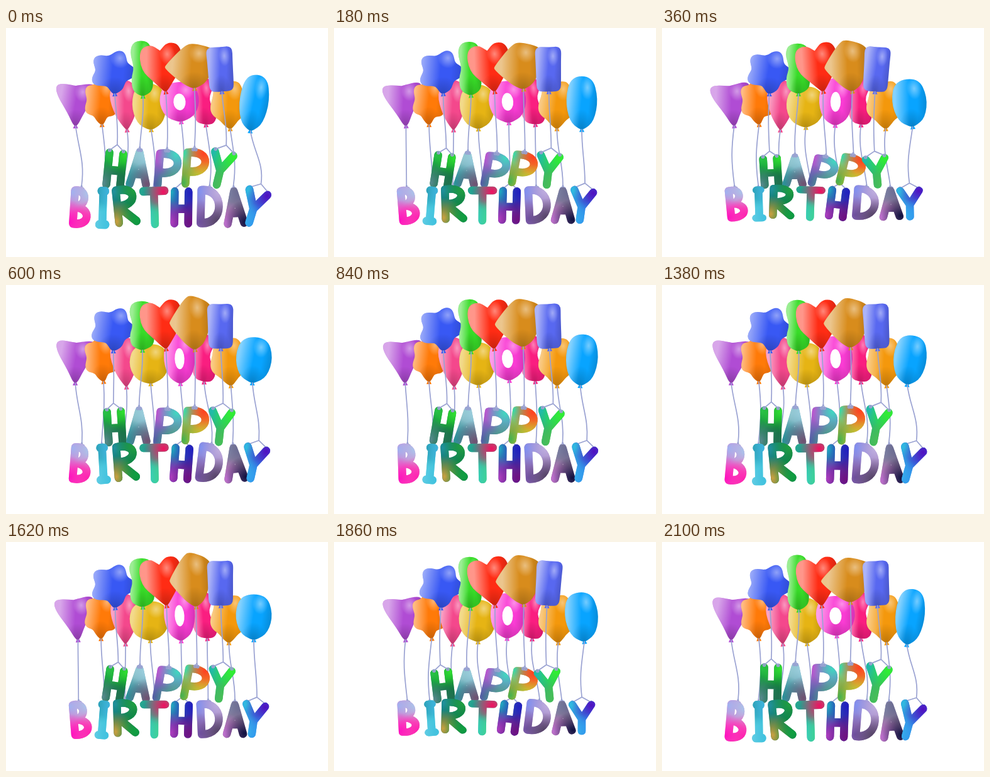
An HTML page with a canvas that plays this animation: 512 by 365 pixels, repeating every 2160 ms.

```html
<!DOCTYPE html>
<html lang="en">
<head>
<meta charset="utf-8">
<title>Happy Birthday</title>
<style>
html, body { margin: 0; width: 100%; height: 100%; overflow: hidden; background: #fff; }
canvas { display: block; }
</style>
</head>
<body>
<canvas id="stage" width="512" height="365"></canvas>
<script>
const ctx = document.getElementById('stage').getContext('2d');
const LOOP = 2160, STEP = 60, STRING = '#9aa2d2', DEG = Math.PI / 180;

// Outlines fill -50..50 both ways, with the knot at 0,50
const lobes = (count, depth, turn) => {
  const pts = [[-5, 50]];
  for (let deg = 110; deg <= 430; deg += 8) {
    const r = 1 - depth + depth * Math.cos(count * (deg - turn) * DEG);
    pts.push([56 * r * Math.cos(deg * DEG), -3 + 51 * r * Math.sin(deg * DEG)]);
  }
  return [...pts, [5, 50]];
};
// Mirrors a left half, listed from the knot upwards
const mirror = half => [...half, ...half.map(([x, y]) => [-x, y]).reverse()];

const egg = mirror([[-8, 50], [-44, 34], [-59, -10], [-38, -54]]);
const SHAPES = {
  egg,
  ring: egg,
  triangle: mirror([[-6, 50], [-22, 22], [-60, -30], [-56, -54], [0, -47]]),
  drop: mirror([[-5, 50], [-42, 18], [-62, -28], [-30, -56]]),
  heart: mirror([[-4, 50], [-30, 26], [-64, -4], [-62, -50], [-26, -59], [0, -42]]),
  worm: mirror([[-8, 50], [-54, 40], [-58, 15], [-40, -5], [-60, -35], [-38, -56]]),
  bar: mirror([[-8, 50], [-50, 49], [-52, 20], [-53, -20], [-56, -54], [0, -53]]),
  bean: [[-4, 50], [-48, 40], [-60, -5], [-40, -52], [20, -60], [60, -38], [20, -5], [58, 26], [40, 50]],
  diamond: [[-5, 50], [-30, 34], [-66, -4], [-64, -12], [-12, -55], [10, -58], [62, -38], [62, -10], [32, 38], [5, 50]],
  star: lobes(6, .1, -145),
  splash: lobes(5, .13, -135),
  flower: lobes(5, .07, -125)
};

const GLYPHS = {
  H: 'M-11-23V23M11-23V23M-11 2H11',
  A: 'M-13 23L0-23L13 23M-8 8H8',
  P: 'M-13 23L-11-22C28-28 26 10-10 5',
  Y: 'M-15-23L0 2L15-23M0 2V23',
  B: 'M-10-24V24C18 27 18 0-8 0C12-4 9-28-10-24',
  I: 'M0-24V24M-5 25H5M-3-24H3',
  R: 'M-13 24V-23C22-28 20 2-12 0L15 24',
  T: 'M-17-24H17M0-24V24',
  D: 'M-13-24V24C26 26 24-28-13-24'
};

// size: balloon centre and extent; puff: change of width; spot: letter centre
// turn, swing and phase: rest angle, amplitude and delay of the letter, in degrees
// inks: middle, top left, top right, bottom left, bottom right
const lower = {
  tilt: .8, bob: 3, bow: 5,
  items: [
    { shape: 'triangle', color: '#b04cd4', size: [111, 123, 54, 66], lean: -3, puff: 0,
      glyph: 'B', spot: [118, 283], turn: -1, swing: 6, phase: -39, inks: ['#f070c0', '#a0b0f0', '#a0d0f0', '#ff10c0', '#ff20b0'] },
    { shape: 'star', color: '#ff7a08', size: [151, 118, 50, 72], lean: -4, puff: 0,
      glyph: 'I', spot: [154, 283], turn: 0, swing: 5, phase: 69, inks: ['#40c8d8', '#2090a0', '#40b0e0', '#70d0e8', '#40c0e0'] },
    { shape: 'drop', color: '#f4488c', size: [189, 125, 40, 75], lean: -2, puff: 0,
      glyph: 'R', spot: [190, 280], turn: -2, swing: 4, phase: 174, inks: ['#0a7050', '#2090a0', '#20a040', '#d0a040', '#10a040'] },
    { shape: 'egg', color: '#e6b414', size: [228, 127, 53, 65], lean: -3, puff: -4,
      glyph: 'T', spot: [236, 283], turn: 0, swing: 2, phase: 171, inks: ['#40b890', '#20a090', '#f01060', '#30d0e0', '#40d890'] },
    { shape: 'bean', color: '#fa1e80', size: [314, 119, 35, 71], lean: -5, puff: 0,
      glyph: 'D', spot: [323, 282], turn: 3, swing: 6, phase: -104, inks: ['#a080c0', '#8090f0', '#c0b0e0', '#7050a0', '#504060'] },
    { shape: 'ring', color: '#fa3cd4', size: [276, 119, 51, 68], lean: -2, puff: 6,
      glyph: 'H', spot: [279, 283], turn: 4, swing: 4, phase: -149, inks: ['#4030a0', '#20b0c0', '#2020c0', '#b040c0', '#701080'] },
    { shape: 'flower', color: '#f4980c', size: [354, 122, 54, 77], lean: -3, puff: 0,
      glyph: 'A', spot: [364, 283], turn: -3, swing: 3, phase: 103, inks: ['#907090', '#8090b0', '#606890', '#c070d0', '#101040'] },
    { shape: 'egg', color: '#08a4ff', size: [394, 121, 47, 77], lean: 0, puff: -5,
      glyph: 'Y', spot: [394, 283], turn: 8, swing: 9, phase: 0, inks: ['#3070e0', '#30c0e0', '#5010c0', '#40d0f0', '#30a0f0'] }
  ]
};
const upper = {
  tilt: -.4, bob: -2, bow: 2,
  items: [
    { shape: 'splash', color: '#3858f4', size: [170, 71, 67, 68], lean: -3, puff: 0,
      glyph: 'H', spot: [173, 227], turn: 1, swing: 9, phase: 59, inks: ['#0a7a3a', '#28c048', '#30e030', '#5a8a90', '#207050'] },
    { shape: 'worm', color: '#38dc28', size: [216, 67, 32, 78], lean: -2, puff: -2,
      glyph: 'A', spot: [211, 226], turn: 2, swing: 2, phase: 56, inks: ['#60a0b0', '#98ccd0', '#a8d8e8', '#2a9098', '#705070'] },
    { shape: 'heart', color: '#ff2c14', size: [249, 66, 53, 72], lean: -10, puff: 0,
      glyph: 'P', spot: [255, 227], turn: 7, swing: 5, phase: 170, inks: ['#8070c0', '#c050d0', '#40d8c0', '#5060a0', '#30c070'] },
    { shape: 'diamond', color: '#d88c1c', size: [296, 63, 60, 73], lean: -8, puff: 6,
      glyph: 'P', spot: [299, 225], turn: 6, swing: 5, phase: 155, inks: ['#e0a030', '#30e0b0', '#ff4020', '#40b050', '#c0d030'] },
    { shape: 'bar', color: '#5868f0', size: [341, 67, 38, 69], lean: 0, puff: 0,
      glyph: 'Y', spot: [341, 227], turn: 4, swing: 10, phase: 17, inks: ['#30c060', '#20b8b0', '#30f030', '#40b070', '#50c050'] }
  ]
};

// Three sways a loop; balloons puff up twice a loop and keep their area
const wave = (t, cycles, phase = 0) => Math.cos((360 * cycles * t / LOOP - phase) * DEG);

function balloonPose(item, row, t) {
  const [x, y, w, h] = item.size;
  const grow = 1 + item.puff / w * wave(t, 2);
  const angle = (item.lean + row.tilt * item.swing * wave(t, 3, item.phase)) * DEG;
  const height = h / grow;
  return {
    x, y, angle, width: w * grow, height,
    knotX: x - Math.sin(angle) * height / 2,
    knotY: y + Math.cos(angle) * height / 2
  };
}

function letterPose(item, row, t) {
  const [x, y] = item.spot;
  return {
    x, y: y + row.bob * wave(t, 3),
    angle: (item.turn + item.swing * wave(t, 3, item.phase)) * DEG,
    stretch: 1 + .09 * wave(t, 3)
  };
}

function outline(pts) {
  const mid = (a, b) => [(a[0] + b[0]) / 2, (a[1] + b[1]) / 2];
  ctx.beginPath();
  ctx.moveTo(...mid(pts[pts.length - 1], pts[0]));
  pts.forEach((p, i) => ctx.quadraticCurveTo(...p, ...mid(p, pts[(i + 1) % pts.length])));
  ctx.closePath();
}

function glow(x, y, r, color) {
  const g = ctx.createRadialGradient(x, y, 0, x, y, r);
  g.addColorStop(0, color);
  g.addColorStop(1, color.slice(0, 7) + '00');
  return g;
}

function sideLight() {
  const g = ctx.createLinearGradient(-50, 8, 50, 28);
  g.addColorStop(0, '#ffffff80');
  g.addColorStop(.45, '#ffffff00');
  g.addColorStop(.7, '#00000000');
  g.addColorStop(1, '#00000028');
  return g;
}

function drawBalloon(item, row, t) {
  const { x, y, angle, width, height } = balloonPose(item, row, t);
  ctx.save();
  ctx.translate(x, y);
  ctx.rotate(angle);
  ctx.fillStyle = item.color;
  ctx.beginPath();
  ctx.moveTo(0, height / 2 - 5);
  ctx.lineTo(4, height / 2 + 4);
  ctx.lineTo(-4, height / 2 + 4);
  ctx.fill();
  ctx.scale(width / 100, height / 100);
  outline(SHAPES[item.shape]);
  if (item.shape === 'ring') {
    ctx.moveTo(17, -2);
    ctx.ellipse(0, -2, 17, 22, 0, 0, 7);
  }
  for (const paint of [item.color, sideLight(), glow(0, 50, 40, '#00000038'), glow(20, -32, 24, '#ffffff70')]) {
    ctx.fillStyle = paint;
    ctx.fill('evenodd');
  }
  ctx.restore();
}

function drawString(item, row, t) {
  const { knotX, knotY } = balloonPose(item, row, t);
  const { x, y, angle, stretch } = letterPose(item, row, t);
  const reach = { H: 11, Y: 15 }[item.glyph] || 2;
  const sin = Math.sin(angle), cos = Math.cos(angle);
  const at = (px, py) => [x + px * cos - py * stretch * sin, y + px * sin + py * stretch * cos];
  const [jointX, jointY] = at(0, reach > 2 ? -36 : -33);
  const bend = row.bow * wave(t, 3), pull = (jointY - knotY) * .4;
  ctx.strokeStyle = STRING;
  ctx.lineWidth = 1.7;
  ctx.beginPath();
  ctx.moveTo(knotX, knotY);
  ctx.bezierCurveTo(knotX + bend, knotY + pull, jointX + bend, jointY - pull, jointX, jointY);
  for (const side of [-reach, reach]) {
    const [endX, endY] = at(side, -27);
    ctx.moveTo(jointX, jointY);
    ctx.lineTo(endX, endY);
    ctx.moveTo(endX + 2, endY);
    ctx.arc(endX, endY, 2, 0, 7);
  }
  ctx.stroke();
}

function drawLetter(item, row, t) {
  const { x, y, angle, stretch } = letterPose(item, row, t);
  const [middle, ...corners] = item.inks;
  const path = new Path2D(GLYPHS[item.glyph]);
  ctx.save();
  ctx.translate(x, y);
  ctx.rotate(angle);
  ctx.scale(1, stretch);
  ctx.lineWidth = 12.5;
  ctx.strokeStyle = middle;
  ctx.stroke(path);
  corners.forEach((color, i) => {
    ctx.strokeStyle = glow(i % 2 ? 15 : -15, i < 2 ? -22 : 22, 32, color);
    ctx.stroke(path);
  });
  ctx.restore();
}

function draw(now) {
  const t = Math.floor(now % LOOP / STEP) * STEP;
  const each = (row, paint) => row.items.forEach(item => paint(item, row, t));
  ctx.fillStyle = '#fff';
  ctx.fillRect(0, 0, 512, 365);
  ctx.lineCap = ctx.lineJoin = 'round';
  each(lower, drawBalloon);
  each(upper, drawBalloon);
  each(lower, drawString);
  each(upper, drawLetter);
  each(upper, drawString);
  each(lower, drawLetter);
}

let start;
function tick(now) {
  start ??= now;
  draw(now - start);
  requestAnimationFrame(tick);
}
draw(0);
requestAnimationFrame(tick);
</script>
</body>
</html>
```
